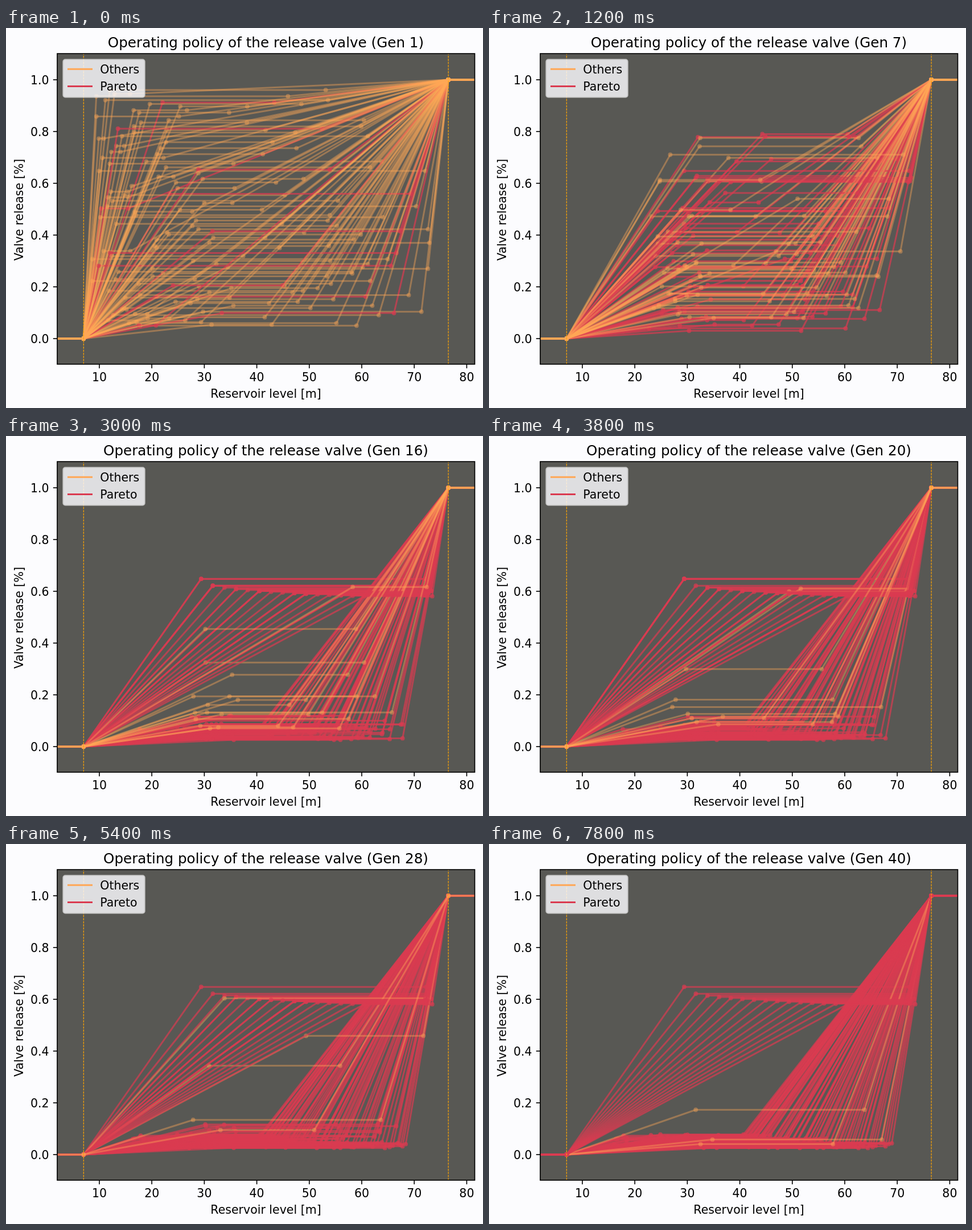
Recreate the animation shown at these times as an HTML page with a canvas. Size 838 by 668 pixels, loop 8000 ms.

```html
<!DOCTYPE html>
<html lang="en">
<head>
<meta charset="utf-8">
<title>Valve policy</title>
<style>
  html, body { margin: 0; width: 100%; height: 100%; overflow: hidden; background: #fcfcfe; }
  canvas { display: block; width: 838px; height: 668px; }
</style>
</head>
<body>
<canvas id="stage" width="838" height="668"></canvas>
<script>
const ctx = document.getElementById('stage').getContext('2d');
const GENS = 40, STEP = 200, POP = 100;
const BOX = { l: 90, t: 45, w: 733.5, h: 546, b: 591 };
const ORANGE = '#ffa755', RED = '#da3b50';
const FONT = '"DejaVu Sans", sans-serif';

const px = level => 71.8 + 9.22 * level;
const py = release => 546 - 455 * release;
const LOW = [px(7), py(0)], HIGH = [px(76.5), py(1)];

const frac = v => v - Math.floor(v);
const hash = n => frac(Math.sin(n * 12.9898 + 4.1) * 43758.5453);
const mix = (a, b, k) => a + (b - a) * k;
const range = (n, make) => Array.from({ length: n }, (_, i) => make(i));

// A policy is a plateau: [start level, end level, release].

// Front members with little release, ending ever further right.
function lowFront(i) {
  const u = frac(i * 0.618034 + 0.55);
  return [
    mix(16, 36, hash(i + 90)),
    40.7 + 28.6 * Math.pow(u, 1.6),
    mix(0.025, mix(0.09, 0.05, u), hash(i * 3 + 140))
  ];
}

// Front members with much release: the later they start, the lower they sit.
function highFront(i) {
  const u = i / 14;
  return [
    mix(29.4, 60.5, u),
    71.7 + 1.8 * hash(i + 11),
    0.648 - 0.067 * Math.pow(u, 0.35)
  ];
}

// A random policy as found in the first generation.
function wild(id) {
  const release = 0.05 + 0.92 * Math.pow(frac(id * 0.618034), 1.25);
  const start = 8.5 + (30 - 14 * release) * Math.pow(hash(id), 1.2);
  const reach = Math.pow(hash(id + 300), 0.6 + 1.6 * release);
  return [start, mix(start, 74.5, reach), release];
}

// Random policies drift to the front, their levels sooner than their release.
function searcher(id, k) {
  const goal = hash(id + 700) < 0.25
    ? highFront(Math.floor(15 * hash(id + 40)))
    : [mix(27, 37, hash(id + 50)), mix(44, 68, hash(id + 60)), mix(0.03, 0.12, hash(id + 70))];
  const kx = Math.min(1, k * 1.7);
  return wild(id).map((v, j) => mix(v, goal[j], j < 2 ? kx : k));
}

function population(gen) {
  const age = gen - 1;
  const low = range(Math.max(0, Math.floor((gen - 5) * 2.5)), lowFront);
  const high = range(Math.min(15, Math.max(0, Math.floor((gen - 4) * 1.9))), highFront);
  const nOthers = Math.round(2 + 86 * Math.exp(-age / 8));
  const nFree = Math.max(0, POP - low.length - high.length - nOthers);
  // Each slot gets a fresh policy every few generations.
  const fresh = slot => slot + POP * Math.floor(age / 3 + hash(slot + 20) * 0.99);
  const others = range(nOthers, i => {
    const k = 1 - Math.exp(-age / 9);
    return searcher(fresh(i), hash(fresh(i) + 80) < 0.3 ? k * 0.7 : k);
  });
  const free = range(nFree, i => searcher(fresh(POP - 1 - i), Math.min(1, age / 13)));
  return { others, pareto: [...low, ...free, ...high] };
}

function line(points, color, width) {
  ctx.strokeStyle = color;
  ctx.lineWidth = width;
  ctx.beginPath();
  points.forEach(([x, y]) => ctx.lineTo(x, y));
  ctx.stroke();
}

function policy([start, end, release], color, alpha) {
  const y = py(release);
  const knots = [LOW, [px(start), y], [px(end), y], HIGH];
  ctx.globalAlpha = alpha;
  line([[80, LOW[1]], ...knots, [840, HIGH[1]]], color, 3);
  ctx.fillStyle = color;
  ctx.beginPath();
  for (const [x, ky] of knots) {
    ctx.moveTo(x + 3.9, ky);
    ctx.arc(x, ky, 3.9, 0, 7);
  }
  ctx.fill();
  ctx.globalAlpha = 1;
}

function policies(gen) {
  const { others, pareto } = population(gen);
  // Half of the others lie on top, unless only a few are left.
  const cut = others.length > 4 ? Math.ceil(others.length / 2) : others.length;
  const orange = p => policy(p, ORANGE, 0.4);
  const red = p => policy(p, RED, 0.7);
  pareto.slice(0, -9).forEach(red);
  others.slice(0, cut).forEach(orange);
  pareto.slice(-9).forEach(red);
  others.slice(cut).forEach(orange);
}

function text(str, x, y, size = 20.53, align = 'center') {
  ctx.font = size + 'px ' + FONT;
  ctx.textAlign = align;
  ctx.fillStyle = '#000';
  ctx.fillText(str, x, y);
}

function legend() {
  ctx.beginPath();
  ctx.roundRect(100.3, 55.3, 143.5, 66.5, 4);
  ctx.fillStyle = 'rgba(252,252,255,0.82)';
  ctx.fill();
  ctx.strokeStyle = 'rgba(204,204,204,0.8)';
  ctx.lineWidth = 2;
  ctx.stroke();
  [['Others', ORANGE, 72.3], ['Pareto', RED, 102.6]].forEach(([name, color, y]) => {
    line([[108, y], [152, y]], color, 3);
    text(name, 165.3, y + 7.4, 20.53, 'left');
  });
}

function axes() {
  for (let v = 10; v <= 80; v += 10) {
    line([[px(v), BOX.b], [px(v), BOX.b + 7.2]], '#000', 1.64);
    text(v, px(v), 621);
  }
  for (let i = 0; i <= 5; i++) {
    const y = py(i / 5);
    line([[BOX.l, y], [BOX.l - 7.2, y]], '#000', 1.64);
    text((i / 5).toFixed(1), 75.6, y + 7.7, 20.53, 'right');
  }
  ctx.strokeRect(BOX.l, BOX.t, BOX.w, BOX.h);
  text('Reservoir level [m]', 456.5, 650);
  ctx.save();
  ctx.translate(29.5, 319.5);
  ctx.rotate(-Math.PI / 2);
  text('Valve release [%]', 0, 0);
  ctx.restore();
}

function draw(gen) {
  ctx.fillStyle = '#fcfcfe';
  ctx.fillRect(0, 0, 838, 668);
  ctx.save();
  ctx.beginPath();
  ctx.rect(BOX.l, BOX.t, BOX.w, BOX.h);
  ctx.clip();
  ctx.fillStyle = '#585854';
  ctx.fillRect(BOX.l, BOX.t, BOX.w, BOX.h);
  ctx.lineJoin = 'round';
  policies(gen);
  ctx.setLineDash([3.8, 1.64]);
  for (const [x] of [LOW, HIGH]) line([[x, BOX.b], [x, BOX.t]], '#ffa500', 1.2);
  ctx.restore();
  legend();
  axes();
  text(`Operating policy of the release valve (Gen ${gen})`, 456.5, 33.5, 24.64);
}

let shown = 0;
const start = performance.now();
function tick() {
  const t = (performance.now() - start) % (GENS * STEP);
  const gen = Math.floor(t / STEP) + 1;
  if (gen !== shown) draw(shown = gen);
  requestAnimationFrame(tick);
}
tick();
</script>
</body>
</html>
```
